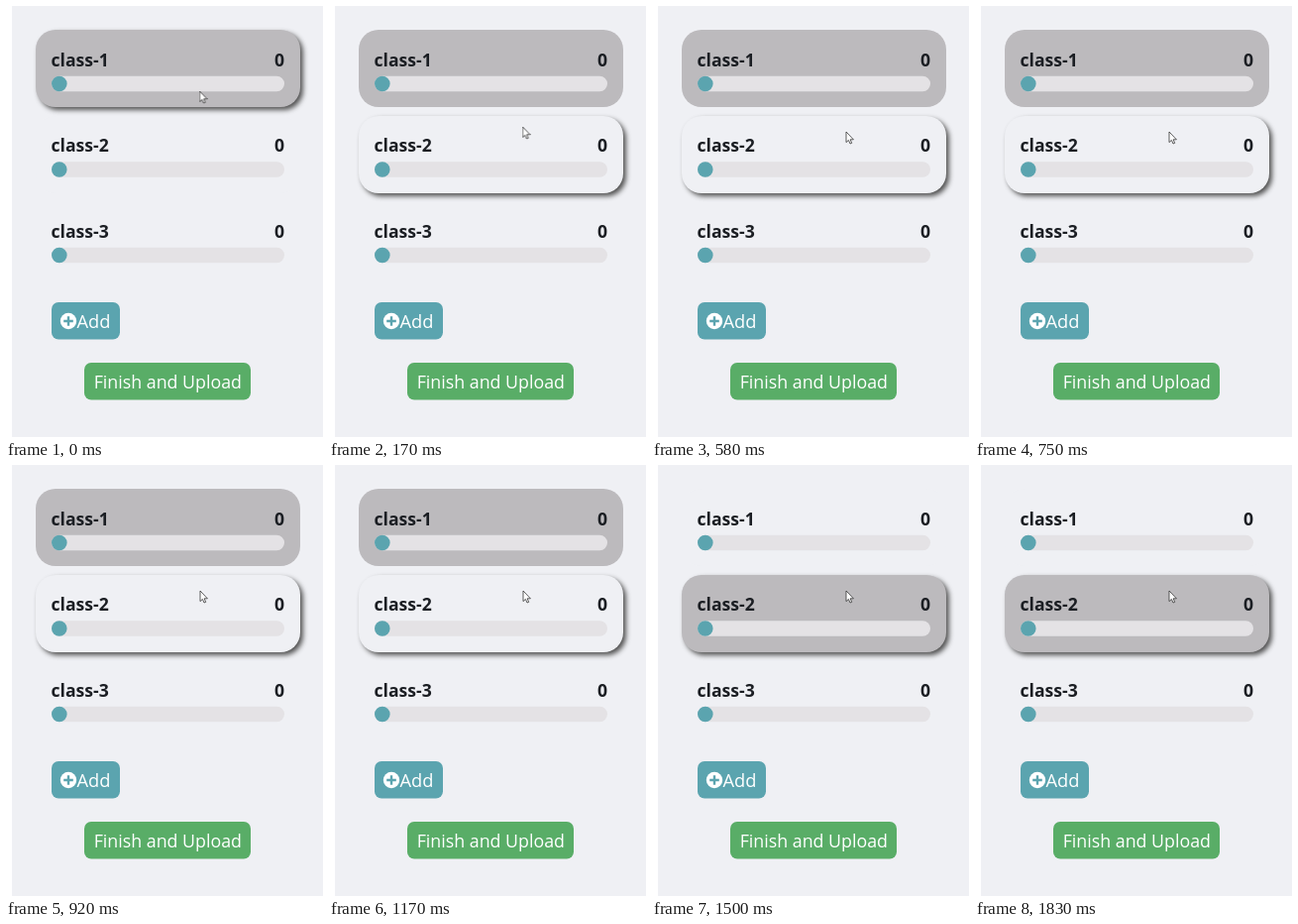
Animation of 320 by 435 pixels, one loop 1.91 s. Source, as an HTML page:

```html
<!DOCTYPE html>
<html lang="en">
<head>
<meta charset="utf-8">
<title>Class list</title>
<style>
  :root { --page: #eff0f4; --teal: #5ba4af; --loop: 1910ms step-end infinite; }
  html, body { margin: 0; width: 100%; height: 100%; overflow: hidden; }
  body { background: #fff; font: 17.8px/1 "Open Sans", "Noto Sans", sans-serif; }
  .stage { position: relative; width: 320px; height: 435px; overflow: hidden;
    background: linear-gradient(90deg, #fff 6px, var(--page) 6px); }
  .card { position: absolute; left: 30px; width: 267px; height: 78px; border-radius: 20px; }
  .first { top: 24px; animation: deselect var(--loop), leave var(--loop); }
  .second { top: 110.5px; animation: select var(--loop), enter var(--loop); }
  svg { position: absolute; inset: 0; }
  .label { font-weight: 700; font-size: 17.6px; fill: #1b1e23; }
  .button { fill: #fff; }
  .end { text-anchor: end; }
  .middle { text-anchor: middle; }
  .pointer { animation: move var(--loop); }

  @keyframes deselect { 0% { background: #bcbabd } 65.44%, 100% { background: var(--page) } }
  @keyframes select { 0% { background: var(--page) } 65.44%, 100% { background: #bcbabd } }
  @keyframes leave {
    0% { box-shadow: 3px 3px 5px #555 }
    4.188%, 100% { box-shadow: none }
  }
  @keyframes enter {
    0% { box-shadow: none }
    4.188%, 100% { box-shadow: 3px 3px 5px #555 }
  }
  @keyframes move {
    0% { transform: translate(195.5px, 86px) }
    4.188% { transform: translate(195.5px, 112px) }
    8.9% { transform: translate(195.5px, 122px) }
    13.088% { transform: translate(196px, 126px) }
    17.27%, 100% { transform: translate(196px, 127px) }
  }
</style>
</head>
<body>
<div class="stage">
  <div class="card first"></div>
  <div class="card second"></div>
  <svg width="320" height="435" viewBox="0 0 320 435">
    <defs>
      <g id="slider">
        <rect x="46" y="70.7" width="235" height="15.6" rx="7.8" fill="#e4e2e5"/>
        <circle cx="53.8" cy="78.5" r="7.8" fill="#5ba4af"/>
      </g>
    </defs>
    <g class="label">
      <use href="#slider"/>
      <text x="45.5" y="60.7">class-1</text><text class="end" x="281" y="60.7">0</text>
      <use href="#slider" y="86.5"/>
      <text x="45.5" y="147.2">class-2</text><text class="end" x="281" y="147.2">0</text>
      <use href="#slider" y="173"/>
      <text x="45.5" y="233.7">class-3</text><text class="end" x="281" y="233.7">0</text>
    </g>
    <g class="button">
      <rect x="46" y="299" width="69" height="37.5" rx="7" fill="#5ba4af"/>
      <circle cx="63" cy="318" r="8.2"/>
      <path d="M63 313.2v9.6M58.2 318h9.6" stroke="#5ba4af" stroke-width="2.4"/>
      <text x="71.5" y="324.8" font-size="18.3">Add</text>
      <rect x="79" y="360" width="168" height="37.5" rx="7" fill="#59ad67"/>
      <text class="middle" x="163.3" y="386">Finish and Upload</text>
    </g>
    <path class="pointer" d="M0 0V10.6L2.4 8.4L4 12L5.7 11.3L4.1 7.8H7.4Z"
      fill="#fff" stroke="#333" stroke-width=".8" stroke-linejoin="round"/>
  </svg>
</div>
</body>
</html>
```
